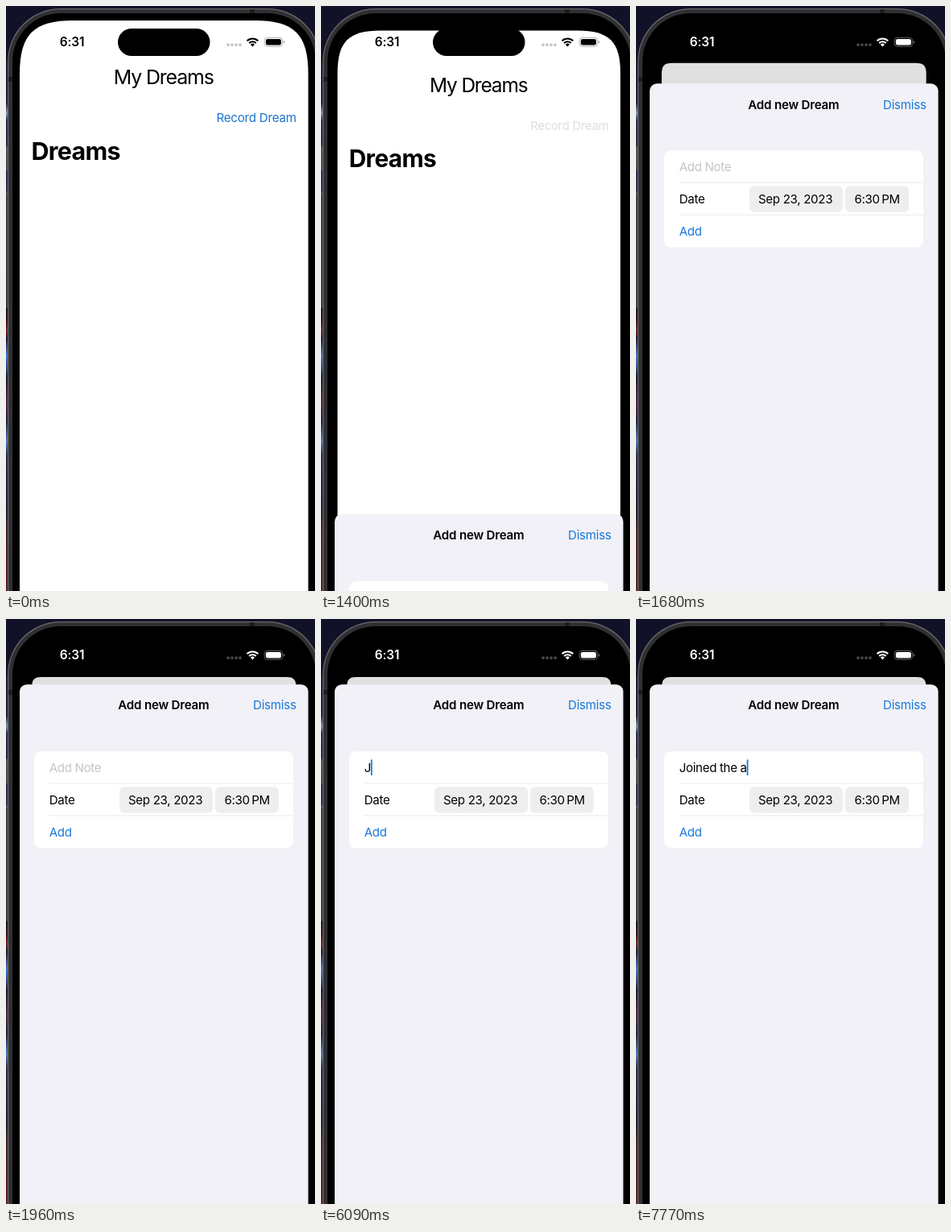
Recreate the animation shown at these times as an HTML page with a canvas. Size 384 by 726 pixels, loop 8000 ms.

```html
<!DOCTYPE html>
<html lang="en">
<head>
<meta charset="utf-8">
<title>My Dreams</title>
<style>
  html, body { margin: 0; width: 100%; height: 100%; overflow: hidden; background: #000; }
  canvas { display: block; width: 384px; height: 726px; }
</style>
</head>
<body>
<canvas id="stage"></canvas>
<script>
const W = 384, H = 726, LOOP = 8000, STEP = 70;
const BLUE = '#1678da', MID = 196.3;
const SCREEN = { x: 17, y: 18, w: 358.6, h: 778 };
const NOTE = 'Joined the a';
const KEY_TIMES = [6090, 6230, 6440, 6580, 6650, 6930, 7000, 7210, 7350, 7490, 7630, 7770];

const canvas = document.getElementById('stage');
const ctx = canvas.getContext('2d');
const dpr = window.devicePixelRatio || 1;
canvas.width = W * dpr;
canvas.height = H * dpr;

const clamp = v => Math.max(0, Math.min(1, v));
const mix = (a, b, p) => a + (b - a) * p;
const gray = v => `rgb(${v},${v},${v})`;

function box(x, y, w, h, r, fill) {
  ctx.beginPath();
  ctx.roundRect(x, y, w, h, r);
  ctx.fillStyle = fill;
  ctx.fill();
}

// Panel whose top corners ease into the straight edges.
function smoothPanel({ x, y, w, h }, r, fill) {
  const reach = r * 1.3, pull = r * 0.34, right = x + w;
  ctx.beginPath();
  ctx.moveTo(x, y + h);
  ctx.lineTo(x, y + reach);
  ctx.bezierCurveTo(x, y + pull, x + pull, y, x + reach, y);
  ctx.lineTo(right - reach, y);
  ctx.bezierCurveTo(right - pull, y, right, y + pull, right, y + reach);
  ctx.lineTo(right, y + h);
  ctx.fillStyle = fill;
  ctx.fill();
}

function text(str, x, y, { size = 15.1, weight = 400, tracking = -0.32, color = '#000' } = {}) {
  ctx.font = `${weight} ${size}px Inter, sans-serif`;
  ctx.letterSpacing = tracking + 'px';
  ctx.fillStyle = color;
  ctx.fillText(str, x, y);
}

function drawBackdrop() {
  ctx.fillStyle = '#111227';
  ctx.fillRect(0, 0, W, H);
  const strip = ctx.createLinearGradient(0, 0, 0, H);
  const stops = [
    [0, '#111227'], [120, '#1b1d3c'], [133, '#8090b8'], [142, '#232a58'], [173, '#20264c'],
    [175, '#505052'], [203, '#48484a'], [206, '#242a56'], [231, '#2b3058'], [232, '#565658'],
    [236, '#3a3a3c'], [374, '#39393b'], [376, '#121018'], [392, '#3a1018'], [403, '#7a2026'],
    [413, '#1a1730'], [434, '#4272c4'], [450, '#294784'], [460, '#11152c'], [492, '#5b1f48'],
    [515, '#1c1c3a'], [540, '#4a78bd'], [558, '#23284e'], [630, '#181a30'], [645, '#4a1c22'],
    [726, '#591e20']
  ];
  for (const [y, color] of stops) strip.addColorStop(y / H, color);
  ctx.fillStyle = strip;
  ctx.fillRect(0, 70, 5, H);
}

function drawPhone() {
  box(2, 3, 389, 800, 66, '#68686b');
  box(3.2, 4.2, 386.6, 800, 65, '#303032');
  ctx.fillStyle = '#1d1d1f';
  ctx.fillRect(303, 4.2, 6, 5);
  ctx.fillRect(3.2, 88, 5, 6);
  box(8, 9, 377, 800, 60, '#000');
}

// Root page: shrinks into a card behind the sheet.
function drawPage(t, p) {
  const scale = mix(1, 0.915, p);
  const top = mix(SCREEN.y, 72, p);
  const radius = mix(51, 10, p);
  const dim = 0.122 * clamp((p - 0.25) / 0.7);
  ctx.save();
  ctx.translate(MID, top);
  ctx.scale(scale, scale);
  ctx.translate(-MID, -SCREEN.y);
  smoothPanel(SCREEN, radius, gray(Math.round(255 * (1 - dim))));
  text('My Dreams', 133.8, 96.5, { size: 24.9, tracking: -1.15 });
  const link = t < 1260 ? '#1a72cc' : t < 1400 ? 'rgba(22,120,218,0.25)' : '#dededf';
  text('Record Dream', 261.5, 144.3, { color: link, tracking: -0.22 });
  text('Dreams', 31.5, 191.3, { size: 30.4, weight: 700, tracking: -0.65 });
  ctx.restore();
}

function caretAlpha(t) {
  if (t < 4620) return 0;
  if (t < 5320) return 1;
  if (t < 5390) return 0.5;
  if (t < 5670) return 0;
  if (t < 5810) return t < 5740 ? 0.35 : 0.7;
  return 1;
}

function drawSheet(t, top) {
  ctx.save();
  ctx.translate(0, top);
  box(SCREEN.x, 0, SCREEN.w, H, [9, 9, 0, 0], '#f2f1f7');
  text('Add new Dream', 139.3, 31.2, { weight: 600, tracking: -0.2 });
  text('Dismiss', 307, 31.2, { color: BLUE, tracking: -0.22 });

  box(35, 83, 322, 120.3, 9, '#fff');
  ctx.fillStyle = '#e3e3e6';
  ctx.fillRect(54, 122.4, 303, 0.8);
  ctx.fillRect(54, 162.4, 303, 0.8);

  const typed = NOTE.slice(0, KEY_TIMES.filter(k => k <= t).length);
  text(typed || 'Add Note', 53.7, 108.8, { color: typed ? '#000' : '#c4c4c6' });
  const caretX = 53.6 + ctx.measureText(typed).width;
  ctx.globalAlpha = caretAlpha(t);
  box(caretX, 93, 1.8, 20, 0.9, BLUE);
  ctx.globalAlpha = 1;

  text('Date', 53.7, 149);
  box(141, 127, 116, 32.5, 6, '#eeeeef');
  box(260, 127, 79, 32.5, 6, '#eeeeef');
  text('Sep 23, 2023', 152, 149);
  text('6:30', 271.5, 149);
  text('PM', 305.2, 149);
  text('Add', 53.7, 189, { color: BLUE });
  ctx.restore();
}

function drawStatusBar(light) {
  const fg = gray(Math.round(255 * light));
  box(139, 28, 114.5, 34, 17, '#000');
  text('6:31', 66.8, 50.4, { size: 15.4, weight: 600, tracking: -0.1, color: fg });

  ctx.fillStyle = gray(Math.round(mix(198, 70, light)));
  for (let i = 0; i < 4; i++) {
    ctx.beginPath();
    ctx.arc(276 + i * 5, 48.2, 1.9, 0, Math.PI * 2);
    ctx.fill();
  }

  const a0 = -Math.PI * 0.75, a1 = -Math.PI * 0.25;
  ctx.strokeStyle = ctx.fillStyle = fg;
  ctx.lineWidth = 2.1;
  for (const r of [6, 9.7]) {
    ctx.beginPath();
    ctx.arc(306.4, 50.2, r, a0, a1);
    ctx.stroke();
  }
  ctx.beginPath();
  ctx.moveTo(306.4, 50.4);
  ctx.arc(306.4, 50.2, 3.6, a0, a1);
  ctx.fill();

  const rim = gray(Math.round(mix(165, 110, light)));
  ctx.beginPath();
  ctx.roundRect(321.2, 39.3, 22.4, 10.9, 3.6);
  ctx.strokeStyle = rim;
  ctx.lineWidth = 0.9;
  ctx.stroke();
  box(322.9, 41, 19, 7.5, 2.2, fg);
  box(344.8, 43, 1.3, 3.5, [0, 1.2, 1.2, 0], rim);
}

// Critically damped spring, 1 at rest below the screen and 0 when open.
function sheetOffset(t) {
  if (t < 1400) return 1;
  const wt = 0.0173 * (Math.min(t, 1960) - 1347.4);
  return (1 + wt) * Math.exp(-wt);
}

function draw(now) {
  const t = Math.floor((now % LOOP) / STEP) * STEP;
  const offset = sheetOffset(t);
  ctx.setTransform(dpr, 0, 0, dpr, 0, 0);
  drawBackdrop();
  drawPhone();
  drawPage(t, 1 - offset);
  if (offset < 1) drawSheet(t, 81 + 715 * offset);
  drawStatusBar(clamp((t - 1400) / 140));
}

let start;
function tick(now) {
  start ??= now;
  draw(now - start);
  requestAnimationFrame(tick);
}
draw(0);
requestAnimationFrame(tick);
</script>
</body>
</html>
```
